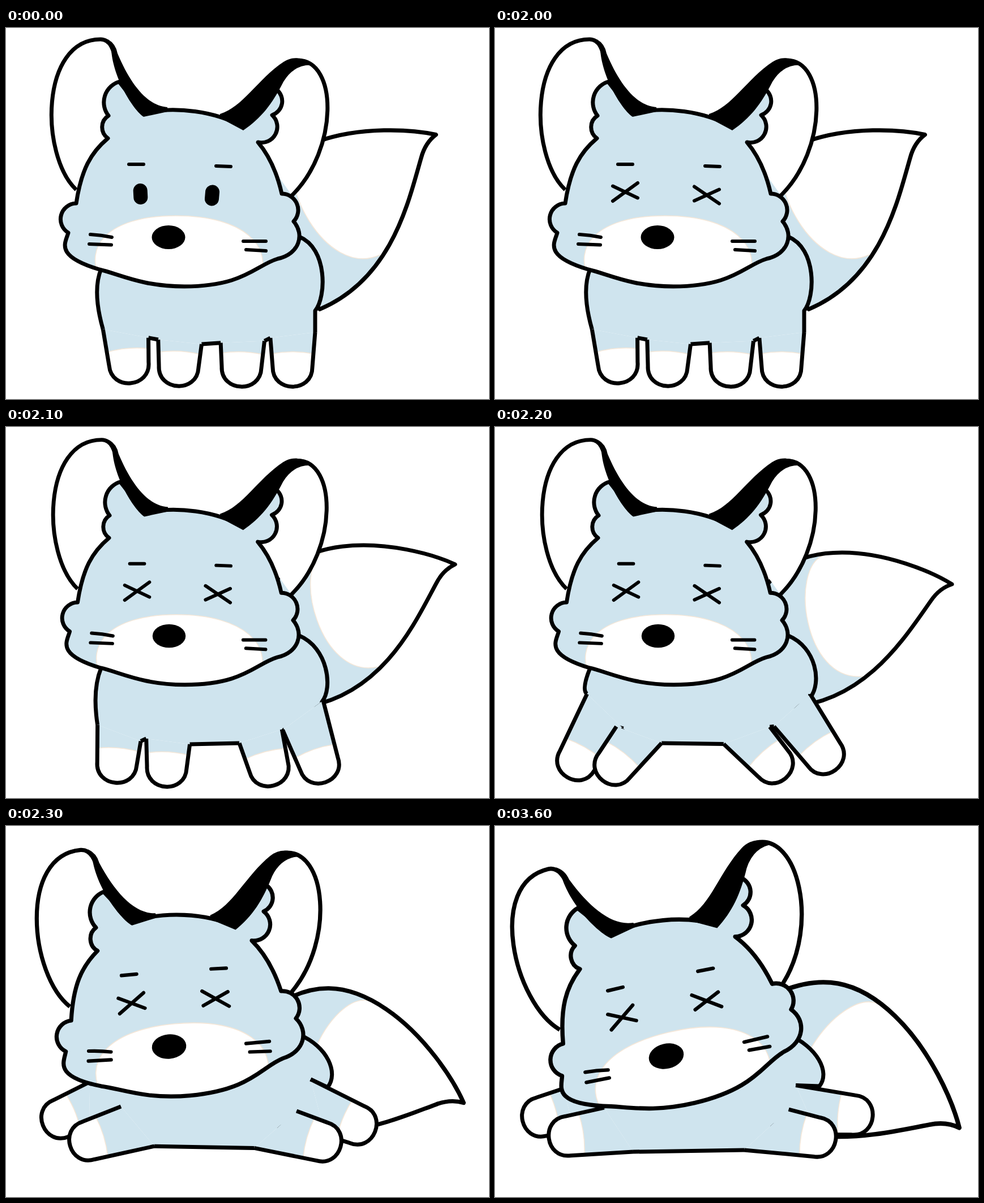
Recreate the animation shown at these times as an HTML page. Size 853 px wide and 656 px high, loop 4.4 s.

```html
<!DOCTYPE html>
<html lang="en">
<head>
<meta charset="utf-8">
<title>Sleepy fox</title>
<style>
  html, body { margin: 0; width: 100%; height: 100%; overflow: hidden; background: #fff; }
  svg { display: block; width: 100%; height: 100%; }
  .ink { stroke: #000; stroke-width: 7; stroke-linejoin: round; fill: none; }
  .thin { stroke: #000; stroke-width: 6; stroke-linecap: round; fill: none; }
  .blue { fill: #cfe4ee; }
  .white { fill: #fff; }
  .patch { fill: #fff; stroke: #f5e7d8; stroke-width: 1.5; }
</style>
</head>
<body>
<svg id="stage" viewBox="0 0 853 656"></svg>
<script>
const LOOP = 4400, FALL_START = 2000, STEP = 100;
const PAW = 35, TAPER = 0.08, SOCK = 24;

const path = (d, cls = "") => `<path d="${d}" class="${cls}"/>`;

// A filled outline with a white marking kept inside it.
const marked = (id, outline, marking) =>
  `<clipPath id="${id}">${path(outline)}</clipPath>` + path(outline, "blue") +
  `<g clip-path="url(#${id})">${path(marking, "patch")}</g>` + path(outline, "ink");

const place = ([x, y, turn, scale], px, py, content) =>
  `<g transform="translate(${x} ${y}) rotate(${turn}) scale(${scale}) translate(${-px} ${-py})">${content}</g>`;

// A leg is [paw x, paw y, turn, left length, right length]; it widens upwards.
const halfWidth = height => PAW + TAPER * height;

function leg([x, y, turn, left, right]) {
  const paw = `L${-PAW} 0C${-PAW} ${PAW * 1.3} ${PAW} ${PAW * 1.3} ${PAW} 0`;
  const run = (a, b) => `M${-halfWidth(a)} ${-a}${paw}L${halfWidth(b)} ${-b}`;
  const outline = run(left, right);
  const sock = run(SOCK, SOCK) + `Q0 ${-SOCK - 7} ${-halfWidth(SOCK)} ${-SOCK}Z`;
  return place([x, y, turn, 1], 0, 0, path(outline, "blue") + path(sock, "patch") + path(outline, "ink"));
}

function legTop([x, y, turn, left, right], side) {
  const height = side < 0 ? left : right, across = side * halfWidth(height);
  const angle = turn * Math.PI / 180, cos = Math.cos(angle), sin = Math.sin(angle);
  return `${x + across * cos + height * sin} ${y + across * sin - height * cos}`;
}

// The torso hangs between the leg tops; the pen lifts across each leg when inked.
function body({ legs, rump: [x, y] }) {
  const torso = pen => "M168 426Q152 465 " +
    legs.map(l => `${legTop(l, -1)}${pen}${legTop(l, 1)}`).join("L") +
    `L${x} ${y}C${x + 20} ${y - 25} 568 390 518 369`;
  const [backLeft, frontLeft, frontRight, backRight] = legs;
  return path(torso("L"), "blue") + path(torso("M"), "ink") +
    [backLeft, backRight, frontLeft, frontRight].map(leg).join("");
}

const tail = marked("tail",
  "M520 495C655 486 725 370 770 307Q785 285 807 278C770 255 690 222 613 222S480 250 450 340Z",
  "M595 205L580 227C520 250 545 450 648 441L670 460H840V205Z");

const SKULL = "M124 310C133 250 150 220 180 195A24 24 0 0 1 181 155A38 38 0 0 1 200 95" +
  "L243 150C300 138 370 147 419 175L478 109A26 26 0 0 1 470 154A28 28 0 0 1 445 202" +
  "C467 228 480 262 487 293A29 29 0 0 1 508 342C528 365 518 400 480 408" +
  "C440 420 420 457 315 457C240 457 200 435 165 427C85 403 105 380 110 362A28 28 0 0 1 124 310Z";
const MUZZLE = "M165 440C140 390 175 332 300 332S470 390 448 440L300 480Z";

const head =
  path("M124 286C60 225 60 20 167 20C185 20 190 40 195 60", "ink white") +
  path("M420 176L480 76Q500 56 515 57C587 57 587 215 505 296", "ink white") +
  marked("skull", SKULL, MUZZLE) +
  path("M180 20Q194 28 197 45C220 100 250 138 285 140V148L243 157C225 145 190 90 186 40Z") +
  path("M378 152C418 140 445 90 490 60Q515 44 545 66Q510 62 490 95C470 135 450 160 419 181L378 159Z") +
  '<ellipse cx="287" cy="370" rx="29.5" ry="21"/>' +
  path("M217 241h26M371 244l26 1M149 365q19 1 38 5M147 382l39 1.5M419 377h40M424 392l35 2", "thin");

const openEye = (x, y, turn) =>
  `<rect x="${x - 12.5}" y="${y - 18.5}" width="25" height="37" rx="12.5" transform="rotate(${turn} ${x} ${y})"/>`;
const crossedEye = (x, y, fall, rise) =>
  path(`M${x - 22} ${y - fall}l44 ${2 * fall}M${x - 22} ${y + rise}l44 ${-2 * rise}`, "thin");
const openEyes = openEye(237.5, 293.5, -3) + openEye(364, 296, 5);
const crossedEyes = crossedEye(230, 290, 10.5, 16) + crossedEye(374, 295.5, 15, 10);

const standing = {
  rump: [546, 500],
  legs: [[217, 594, -5, 65, 43], [305, 599, 3, 46, 42], [416, 600, 2, 42, 48], [506, 600, 0, 52, 62]]
};
const buckling = {
  rump: [558, 486],
  legs: [[196, 595, 5, 65, 43], [284, 602, 3, 49, 43], [464, 601, -15, 54, 58], [553, 596, -19, 78, 104]]
};
const splayed = {
  rump: [557, 478],
  legs: [[145, 590, 30, 111, 90], [211, 598, 38, 56, 82], [491, 595, -42, 84, 52], [581, 579, -36, 92, 101]]
};
const flopped = {
  rump: [568, 462],
  legs: [[97, 517, 68, 70, 40], [146, 556, 73, 72, 108], [558, 558, -74, 112, 58], [620, 528, -68, 45, 106]]
};
const lying = {
  rump: [573, 460],
  legs: [[82, 514, 76, 50, 50], [129, 548, 82, 70, 110], [568, 550, -80, 122, 57], [633, 511, -85, 60, 106]]
};

// Head and tail are placed by pivot x, y, turn in degrees and scale.
const upright = { body: standing, head: [287, 370, 0, 1], tail: [758, 188, -19.3, 1.03] };
const sagging = [288, 369.5, 0, 0.991];
const poses = [
  { ...upright, eyes: openEyes },
  { ...upright, eyes: crossedEyes },
  { body: buckling, head: sagging, tail: [792, 242, -7.1, 1], eyes: crossedEyes },
  { body: splayed, head: sagging, tail: [806, 277, 0, 1], eyes: crossedEyes },
  { body: flopped, head: [288, 390, -5.3, 1.03], tail: [808, 488, 34.4, 1.06], eyes: crossedEyes },
  { body: lying, head: [302.5, 407, -13.3, 1.057], tail: [820, 532, 44, 1.13], eyes: crossedEyes }
];

const stage = document.getElementById("stage");
const start = performance.now();
let shown = -1;

function draw(time) {
  const index = time < FALL_START ? 0 : Math.min(poses.length - 1, 1 + Math.floor((time - FALL_START) / STEP));
  if (index === shown) return;
  shown = index;
  const pose = poses[index];
  stage.innerHTML = place(pose.tail, 806, 277, tail) + body(pose.body) +
    place(pose.head, 287, 370, head + pose.eyes);
}

function tick() {
  draw((performance.now() - start) % LOOP);
  requestAnimationFrame(tick);
}
tick();
</script>
</body>
</html>
```
